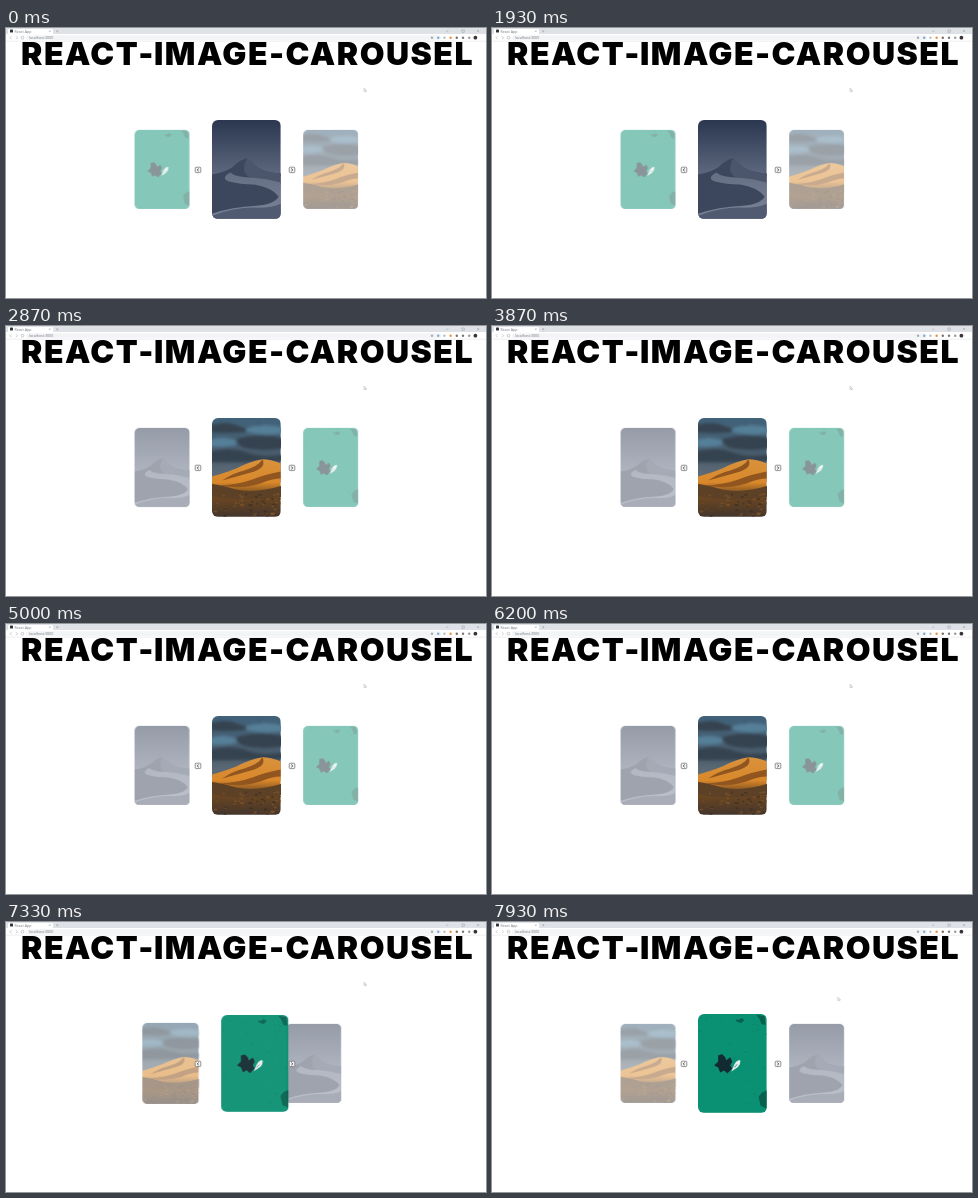
These frames come from a looping animation (480 by 270 pixels, 8 s). An HTML page:

```html
<!DOCTYPE html>
<html lang="en">
<head>
<meta charset="utf-8">
<title>Image carousel</title>
<style>
  html, body { margin: 0; width: 100%; height: 100%; overflow: hidden; background: #fff; }
  #stage { position: relative; width: 480px; height: 270px; overflow: hidden; background: #fff; }
  #stage > svg { position: absolute; left: 0; top: 0; }
  .title { font: 900 32px Inter, sans-serif; letter-spacing: 1.5px; }
  .ui { font: 3.6px "Open Sans", sans-serif; fill: #74787e; }

  .card {
    position: absolute; left: 205.7px; top: 92.3px; width: 68.6px; height: 98.8px;
    border-radius: 6px; overflow: hidden;
    animation: 8s ease infinite;
  }
  .card svg { display: block; width: 100%; height: 100%; }
  .dune { z-index: 2; animation-name: dune; }
  .desert { z-index: 5; animation-name: desert; }
  .sea { animation-name: sea; }

  /* Slides change at 2.02 s and 7.02 s, each taking 0.5 s. */
  @keyframes dune {
    0%, 25.25% { transform: none; opacity: 1; }
    31.5%, 87.75% { transform: translateX(-84.3px) scale(.8); opacity: .5; }
    94%, 100% { transform: translateX(84.3px) scale(.8); opacity: .5; }
  }
  @keyframes desert {
    0%, 25.25% { transform: translateX(84.3px) scale(.8); opacity: .5; }
    31.5%, 87.75% { transform: none; opacity: 1; }
    94%, 100% { transform: translateX(-84.3px) scale(.8); opacity: .5; }
  }
  @keyframes sea {
    0%, 25.25% { transform: translateX(-84.3px) scale(.8); opacity: .5; z-index: 1; }
    31.5% { transform: translateX(84.3px) scale(.8); opacity: .5; z-index: 1; }
    87.75% { transform: translateX(84.3px) scale(.8); opacity: .5; z-index: 3; }
    94%, 100% { transform: none; opacity: 1; z-index: 3; }
  }

  #front { z-index: 9; }
  .cursor { animation: cursor 8s ease-in-out infinite; }
  @keyframes cursor {
    0%, 94.5% { transform: translate(358px, 60px); }
    97.5%, 100% { transform: translate(345.7px, 75px); }
  }
</style>
</head>
<body>
<div id="stage">
  <svg width="480" height="270">
    <rect width="480" height="6" fill="#dee1e6"/>
    <path d="M2 6V2q0-1 1-1H46q1 0 1 1V6z" fill="#fff"/>
    <rect x="4" y="1.6" width="3" height="3" rx=".6" fill="#30343b"/>
    <text class="ui" x="8.5" y="4.6">React App</text>
    <path d="M43 2.4l1.6 1.6m0-1.6l-1.6 1.6M50 3.2h2.4M51.2 2v2.4M440 3.2h2.4M471 2l2.2 2.2m0-2.2l-2.2 2.2" stroke="#9a9da3" stroke-width=".5"/>
    <rect x="456" y="2" width="2.2" height="2.2" fill="none" stroke="#9a9da3" stroke-width=".5"/>
    <path d="M5.5 8.2L4 9.7l1.5 1.5M10 8.2l1.5 1.5L10 11.2" fill="none" stroke="#a5a8ad" stroke-width=".6"/>
    <circle cx="16.5" cy="9.7" r="1.4" fill="none" stroke="#a5a8ad" stroke-width=".6"/>
    <rect x="20" y="7.2" width="415" height="5" rx="2.5" fill="#f3f4f6"/>
    <text class="ui" x="23" y="11">localhost:3000</text>
    <g id="icons"></g>
    <path d="M0 13.2H480" stroke="#e4e6e9" stroke-width=".6"/>
    <text class="title" y="37"><tspan x="15">REACT-</tspan><tspan x="148">IMAGE-</tspan><tspan x="279.500">CAROUSEL</tspan></text>
  </svg>

  <div class="card dune">
    <svg viewBox="0 0 68 98" preserveAspectRatio="none">
      <defs>
        <linearGradient id="night" x2="0" y2="1">
          <stop stop-color="#2b374f"/><stop offset="1" stop-color="#5f6a80"/>
        </linearGradient>
        <linearGradient id="sand" x2="0" y2="1">
          <stop stop-color="#656f84"/><stop offset="1" stop-color="#7a8396"/>
        </linearGradient>
      </defs>
      <rect width="68" height="56" fill="url(#night)"/>
      <path d="M0 54Q12 52 20 47Q28 39 35 38Q40 42 45 47Q54 52 68 53V98H0z" fill="#3c475d"/>
      <path d="M35 38Q40 42 45 47Q54 52 68 53V64Q48 58 36 56Q28 50 35 38z" fill="#4b566c"/>
      <path d="M18 52Q8 58 17 61Q28 64 42 64Q60 67 66 76Q62 84 44 85Q20 86 0 93V98H68V62Q54 58 40 57Q24 57 18 52z" fill="url(#sand)"/>
      <path d="M0 95Q24 86 46 87Q60 87 68 83V98H0z" fill="#505b71"/>
    </svg>
  </div>

  <div class="card desert">
    <svg viewBox="0 0 68 98" preserveAspectRatio="none">
      <defs>
        <linearGradient id="storm" x2="0" y2="1">
          <stop stop-color="#40627a"/><stop offset=".6" stop-color="#4a5c6c"/><stop offset="1" stop-color="#66727b"/>
        </linearGradient>
        <linearGradient id="gold" x2="0" y2="1">
          <stop stop-color="#d8923c"/><stop offset=".4" stop-color="#d9882a"/>
          <stop offset=".62" stop-color="#70481f"/><stop offset="1" stop-color="#43352c"/>
        </linearGradient>
        <filter id="soft"><feGaussianBlur stdDeviation="1.7"/></filter>
        <filter id="edge"><feGaussianBlur stdDeviation=".6"/></filter>
      </defs>
      <rect width="68" height="64" fill="url(#storm)"/>
      <g filter="url(#soft)">
        <path d="M-4 8Q14 2 26 8T48 5V11Q26 17-4 14zM22 22Q44 14 72 20V30Q48 34 30 29zM-4 34Q18 28 34 34T72 36V43Q40 44-4 44z" fill="#36434f"/>
        <path d="M34 10Q52 4 72 10V15Q50 18 34 14zM-4 22Q10 17 24 22V27Q8 30-4 28z" fill="#557f98"/>
      </g>
      <path d="M0 58Q14 54 24 50Q38 43 50 41Q58 41 68 45V98H0z" fill="url(#gold)"/>
      <g filter="url(#edge)">
        <path d="M50 41Q46 48 32 52Q20 55 10 62Q28 57 42 53Q54 49 50 41zM68 53Q52 56 40 61Q26 66 8 67Q30 71 48 65Q60 60 68 60z" fill="#91551f"/>
        <path d="M-2 65Q12 67 24 71Q44 75 70 67V78Q30 84-2 77z" fill="#5d4126"/>
      </g>
      <g id="grass"></g>
    </svg>
  </div>

  <div class="card sea">
    <svg viewBox="0 0 68 98" preserveAspectRatio="none">
      <rect width="68" height="98" fill="#0a9072"/>
      <g id="reef"></g>
      <path d="M37 5l3 1 3-2 3 2-3 3-4-1zM58 1l8 1 1 9-4-1-2-5zM60 82l3-4 5-2v18l-6-3z" fill="#07614e"/>
      <path d="M20 41l4-1 3 3 1 3 4-3 2 4-2 4 2 3-5 5-3-3-4 2-2-5-4-2 4-4z" fill="#122b32"/>
      <path d="M33 57L36 50Q39 45 42 46Q42 51 39 53z" fill="#e9efee"/>
      <path d="M36 53l3-3" stroke="#8b9b9c"/>
    </svg>
  </div>

  <svg id="front" width="480" height="270">
    <g id="buttons"></g>
    <path class="cursor" d="M0 0V3.600L.9 2.800 1.600 4 2.100 3.700 1.500 2.600H2.600z" fill="#fff" stroke="#999" stroke-width=".4"/>
  </svg>
</div>
<script>
  const NS = "http://www.w3.org/2000/svg";
  const add = (id, tag, attrs) => {
    const el = document.createElementNS(NS, tag);
    for (const k in attrs) el.setAttribute(k, attrs[k]);
    document.getElementById(id).append(el);
  };

  let seed = 7;
  const rand = () => (seed = seed * 16807 % 2147483647) / 2147483647;

  function specks(id, n, colors, top, height, size) {
    for (let i = 0; i < n; i++) {
      add(id, "ellipse", {
        cx: rand() * 68, cy: top + rand() * height,
        rx: size * (.5 + rand()), ry: size * (.3 + rand() * .5),
        fill: colors[i % colors.length], opacity: .5
      });
    }
  }
  specks("grass", 70, ["#8a5c2c", "#2f2823", "#634528"], 75, 23, 1.6);
  specks("reef", 50, ["#08826a", "#12987a"], 0, 98, 1.3);

  const tints = ["#aaa", "#79a9d8", "#bbb", "#e8913a", "#7d6a60", "#777", "#999", "#3b3336"];
  tints.forEach((fill, i) => add("icons", "circle", { cx: 426 + i * 6.2, cy: 9.7, r: i > 6 ? 1.9 : 1.2, fill }));

  for (const [x, dir] of [[192, -1], [286, 1]]) {
    add("buttons", "rect", { x: x - 2.8, y: 139.2, width: 5.6, height: 5.4, rx: 1, fill: "#f2f2f2", stroke: "#666", "stroke-width": .7 });
    add("buttons", "path", { d: `M${x - dir * .7} 140.6l${dir * 1.5} 1.3l${-dir * 1.5} 1.3`, fill: "none", stroke: "#333", "stroke-width": .8 });
  }
</script>
</body>
</html>
```
